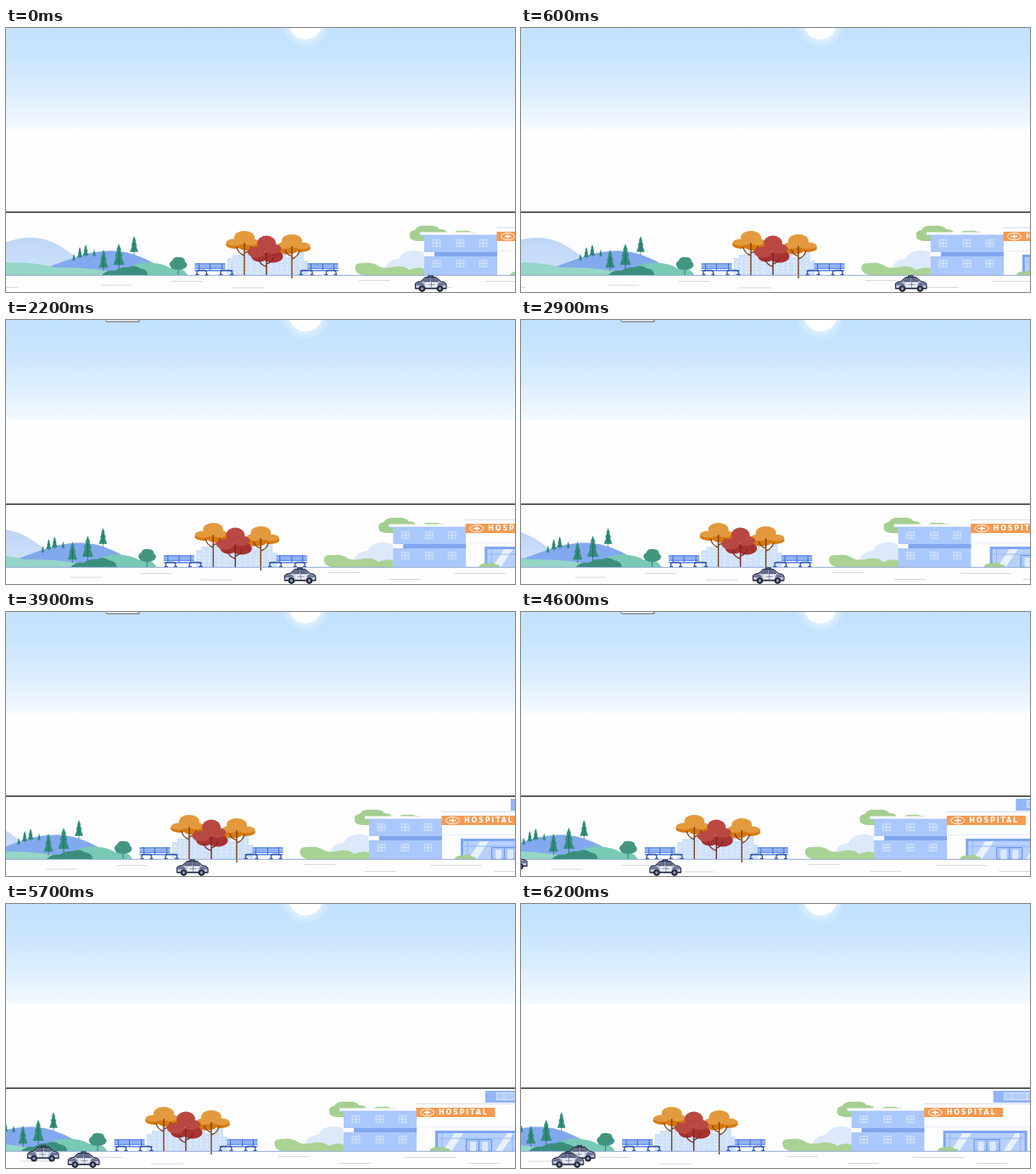
Recreate the animation shown at these times as an HTML page. Size 600 by 311 pixels, loop 6.3 s.

```html
<!DOCTYPE html>
<html lang="en">
<head>
<meta charset="utf-8">
<style>
html, body { margin: 0; width: 100%; height: 100%; overflow: hidden; background: #fefdff; }
svg { display: block; width: 600px; height: 311px; }
</style>
</head>
<body>
<svg viewBox="0 0 600 311">
  <defs>
    <linearGradient id="sky" x2="0" y2="1">
      <stop stop-color="#c2e1fe"/><stop offset=".3" stop-color="#c9e5fe"/>
      <stop offset=".65" stop-color="#dceefe"/><stop offset="1" stop-color="#f5fafe"/>
    </linearGradient>
    <radialGradient id="glow">
      <stop offset=".6" stop-color="#fff" stop-opacity=".5"/><stop offset="1" stop-color="#fff" stop-opacity="0"/>
    </radialGradient>
    <linearGradient id="farHill" x2="0" y2="1">
      <stop stop-color="#bdd6f7"/><stop offset="1" stop-color="#cfe2fa"/>
    </linearGradient>
    <g id="pine">
      <path d="M0 0L3 8 1.8 7.6 4.7 15.5 3 15 6.5 25H-6.5L-3 15-4.7 15.5-1.8 7.6-3 8Z" fill="#2f8f78"/>
      <path d="M0 9V30" stroke="#34566a" stroke-width=".8"/>
    </g>
    <g id="bench" fill="none">
      <path d="M0 1H36M0 3.5H36M0 6H36" stroke="#6d98f1" stroke-width="1.8"/>
      <path d="M5 0V8M18 0V8M32 0V8" stroke="#3f6bd0" stroke-width="1"/>
      <path d="M0 8.7H45" stroke="#4f80e2" stroke-width="1.6"/>
      <path d="M2.5 14V11Q2.5 8.5 5 8.5H11.5Q14 8.5 14 11V14M30.5 14V11Q30.5 8.5 33 8.5H41.5Q44 8.5 44 11V14M1 13.5H5M12 13.5H16M29 13.5H33M41.5 13.5H46" stroke="#31549f" stroke-width="1.3"/>
    </g>
    <path id="window" d="M-4.5-4H4.5V4H-4.5ZM0-4V4M-4.5 0H4.5" fill="#b3cefc" stroke="#deebfe" stroke-width=".7"/>
    <g id="orangeTree">
      <g fill="#d6790c"><ellipse cx="-11" cy="12" rx="11" ry="5"/><ellipse cx="5" cy="14" rx="12" ry="5.5"/></g>
      <g fill="#e39a3e"><ellipse cy="4" rx="12" ry="8"/><ellipse cx="-12" cy="9.5" rx="9.5" ry="4"/><ellipse cx="8" cy="9" rx="9" ry="4"/></g>
      <path d="M0 10V48M0 25Q-8 22-9 15M0 22Q7 20 8 14" fill="none" stroke="#7d3b16" stroke-width="1.4"/>
    </g>
    <g id="car" stroke-linejoin="round">
      <path d="M16 2V.4H22V2Z" fill="#4d79c7" stroke="#282d45" stroke-width=".8"/>
      <path d="M1 10Q2 8 8 7L13 2.3H25L31 7.3Q37 8 37.5 11V15.5H1Z" fill="#c6cadd" stroke="#282d45" stroke-width="1.2"/>
      <path d="M10 7.2L13.8 3.4H18V7.2ZM19.6 3.4H24.5L28.5 7.2H19.6Z" fill="#63718f" stroke="#343b57" stroke-width=".7"/>
      <path d="M1.5 9.2L9 8.2 12 12H1.5ZM29 8.2L36.5 9.5V12H27Z" fill="#6a7598"/>
      <path d="M13 8.6H27L26 14H14Z" fill="#e9ebf5"/>
      <path d="M20 8V14.5M16 11H24" stroke="#747c99" stroke-width=".8"/>
      <path d="M1 15.3H37.5" stroke="#282d45" stroke-width="1.4"/>
      <g fill="#8e98b2" stroke="#22273a" stroke-width="2"><circle cx="9" cy="15.8" r="2.8"/><circle cx="30" cy="15.8" r="2.8"/></g>
    </g>
  </defs>

  <rect width="600" height="311" fill="#fefdff"/>
  <rect width="600" height="119" fill="url(#sky)"/>
  <circle cx="353" cy="-6" r="30" fill="url(#glow)"/>
  <circle cx="353" cy="-6" r="19.5" fill="#fff"/>
  <g id="tip">
    <path d="M119 2.6H157.5V0" fill="none" stroke="#a9adb3"/>
    <path d="M118-2H156.5V1.7H118Z" fill="#fff" stroke="#62666d" stroke-width=".8"/>
  </g>

  <g id="scene">
    <path d="M-40 291V275Q-5 247 30 247C62 247 80 272 115 291Z" fill="url(#farHill)"/>
    <path d="M48 282C80 271 98 262 126 262.5C152 263 172 276 200 291H40Z" fill="#82a9ee"/>
    <path d="M-10 277Q28 274 58 282Q100 281 150 291H-10Z" fill="#94d6c8"/>
    <path d="M135 291Q146 277 165 276.5Q184 276 194 283Q210 281 214 291Z" fill="#78cab5"/>
    <g id="pines"></g>
    <path d="M113 291Q118 285 128 286Q137 281 143 282Q152 278 158 283Q167 284 167 291Z" fill="#3a8f7c"/>
    <path d="M203 278V291" stroke="#36766c"/>
    <path d="M195 283Q190 277 196 274Q198 269 204 270Q211 270 211 275Q216 279 211 283Q203 287 195 283Z" fill="#429681"/>

    <path d="M261 291V271H267V267H278V263H292V268H302V274H316V266H330V270H343V264H351V274H356V291Z" fill="#cfe2fa"/>
    <path d="M264 275V290M270 271V290M276 271V290M282 267V290M288 267V290M296 272V290M312 277V290M319 270V290M325 270V290M332 274V290M338 274V290M347 268V290" stroke="#e3eefd" stroke-width="2" stroke-dasharray="2 2"/>
    <use href="#bench" x="222.5" y="277"/>
    <use href="#bench" transform="translate(391.5 277) scale(-1 1)"/>
    <use href="#orangeTree" x="281" y="243"/>
    <use href="#orangeTree" transform="translate(337 247) scale(-1 1)"/>
    <g fill="#a83232"><ellipse cx="299" cy="269" rx="10" ry="6.5"/><ellipse cx="314.5" cy="269" rx="12" ry="7.5"/></g>
    <g fill="#b94842"><ellipse cx="307" cy="253.5" rx="11" ry="9"/><ellipse cx="295" cy="264" rx="10.5" ry="6.5"/><ellipse cx="314" cy="260" rx="10.5" ry="6"/></g>
    <path d="M307 265V291M307 281Q299 279 298 272M307 278Q314 276 315 270" fill="none" stroke="#762725" stroke-width="1.4"/>

    <path d="M446 291Q446 273 463 272Q468 261 483 262Q492 262 496 268V291Z" fill="#dce9fb"/>
    <path d="M412 285Q409 276 421 277Q432 275 440 281Q448 284 458 281Q471 280 475 285Q487 280 494 284Q507 284 513 291H420Q413 289 412 285Z" fill="#a9d295"/>
    <path d="M476 244Q475 239 482 238Q485 232 497 233Q507 232 511 237Q521 237 520 244L500 251H488Q475 251 476 244Z" fill="#a5cf91"/>
    <path d="M527 244Q528 238 537 239Q545 238 548 240Q556 240 557 244Z" fill="#a5cf91"/>
    <path d="M493 244H579V291H493Z" fill="#aac8fb"/>
    <path d="M488 240.5H579V244H488ZM492.5 264H505V269H492.5Z" fill="#fbfcff"/>
    <path d="M505 264H579V269H505Z" fill="#80a6ef"/>
    <path d="M488 244H579" stroke="#a3c0f6" stroke-width=".8"/>
    <g id="windows"></g>

    <path d="M660 220H740V234H660Z" fill="#92b5f6"/>
    <path d="M673 222.5H732V230.5H673ZM682 222V231M700 222V231" fill="#b3cefb" stroke="#e1edfe" stroke-width=".8"/>
    <path d="M579 235H740V291H579Z" fill="#fdfdff"/>
    <path d="M578 235.3H740" stroke="#d3dced"/>
    <path d="M579 262.5H740" stroke="#e4ebf8" stroke-width=".8"/>
    <path d="M578.5 240H671.5V251H578.5Z" fill="#f79a51"/>
    <g fill="none" stroke="#fff"><ellipse cx="591.5" cy="245.5" rx="8" ry="4"/><path d="M587.5 245.5H595.5M591.5 243V248" stroke-width="1.6"/></g>
    <text x="605" y="248.4" fill="#fff" font-family="'DejaVu Sans', sans-serif" font-weight="700" font-size="8" letter-spacing="1.8">HOSPITAL</text>
    <path d="M601 267H700V291H601Z" fill="#7da6f1"/>
    <path d="M604 270H697V291H604Z" fill="#b7d1fc"/>
    <path d="M610 291L624 270H634L620 291ZM672 291L686 270H694L680 291Z" fill="#e9f2ff"/>
    <path d="M609 270V291M692 270V291M605 276H696" stroke="#91b4f5"/>
    <path d="M637.5 277.5H667.5V291H637.5ZM652.5 278V291" fill="#acc9fb" stroke="#6d96e5" stroke-width="1.2"/>
    <path d="M642 280H649V291H642ZM656 280H663V291H656Z" fill="#dce9fe"/>
    <path d="M594 291Q596 286 604 287Q610 284 614 288Q619 288 619 291Z" fill="#a5cf91"/>
    <path d="M-40 291.4H760" stroke="#8aa3d1" stroke-width=".9"/>
    <path d="M-22 305.5H15M112 303H149M195 298.5H232M266 306H304M416 297.5H453M488 305.5H525M565 298.5H626M640 305.5H677" stroke="#d6d8de"/>
  </g>
  <path d="M0 217H600" stroke="#26282c" stroke-width="1.6"/>
  <use id="backCar" href="#car"/>
  <use id="frontCar" href="#car"/>
</svg>
<script>
const LOOP = 6300, STEP = 100;
const get = id => document.getElementById(id);
const drive = [[0, 481.5], [1200, 399.5], [2200, 327.5], [2900, 272.5], [3900, 200.5], [5200, 108.5], [6300, 29]];

const pines = [[80, 266, .3], [87, 258, .48], [94, 255, .52], [104, 261, .3], [151, 245, .75], [115, 261, .85], [133, 254, 1]];
get("pines").innerHTML = pines.map(([x, y, s]) =>
  `<use href="#pine" transform="translate(${x} ${y}) scale(${s})"/>`).join("");
get("windows").innerHTML = [253.5, 277.5].flatMap(y => [507.5, 535.5, 562.5].map(x =>
  `<use href="#window" x="${x}" y="${y}"/>`)).join("");

function along(points, t) {
  const i = points.findIndex(p => p[0] > t);
  const [t0, a] = points[i - 1], [t1, b] = points[i];
  return a + (b - a) * (t - t0) / (t1 - t0);
}

function draw(now) {
  const t = Math.floor(now % LOOP / STEP) * STEP;
  get("scene").setAttribute("transform", `translate(${-t / 60} 0)`);
  get("frontCar").setAttribute("transform", `translate(${along(drive, t)} 291.3)`);
  get("backCar").setAttribute("transform", `translate(${38 + .05 * (t - 5200)} 284) scale(-1 1)`);
  get("tip").setAttribute("visibility", t >= 700 && t < 5400 ? "visible" : "hidden");
}

const start = performance.now();
function tick() {
  draw(performance.now() - start);
  requestAnimationFrame(tick);
}
tick();
</script>
</body>
</html>
```
